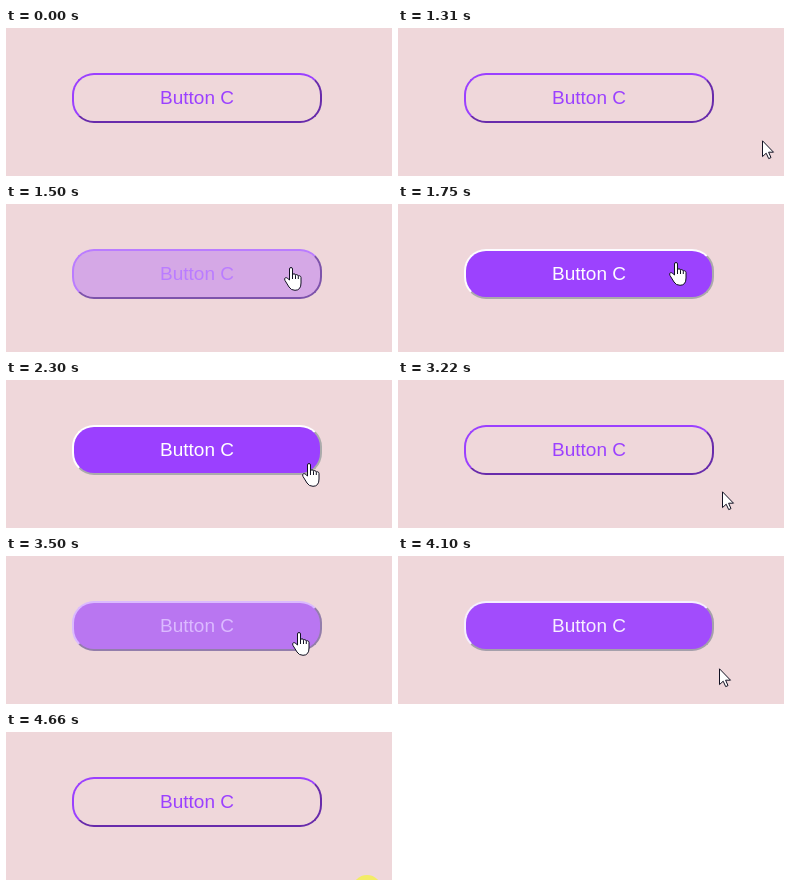
Animation of 386x148 px, one loop 4790 ms. Source, as an HTML page:

```html
<!DOCTYPE html>
<html lang="en">
<head>
<meta charset="utf-8">
<title>Button hover</title>
<style>
  html, body { margin: 0; width: 100%; height: 100%; overflow: hidden; background: #efd7da; }
  #button {
    position: absolute; left: 66px; top: 45px; width: 250px; height: 50px;
    box-sizing: border-box; padding: 0; border: 2px outset; border-radius: 22px;
    font: 19px Arial, "Liberation Sans", sans-serif; text-align: center;
  }
  svg { position: absolute; left: 0; top: 0; pointer-events: none; }
  #arrow, #hand { fill: #fff; stroke: #112; stroke-linejoin: round; }
</style>
</head>
<body>
<button id="button">Button C</button>
<svg width="386" height="148">
  <circle id="click" cx="361" cy="157.6" r="14.6" fill="#f3ec66"/>
  <path id="arrow" d="M.5 .8V16.6L4.2 13.2 6.7 18.6 9 17.6 6.6 12.2H11.5Z"/>
  <path id="hand" d="M-1.5 13V2Q-1.5 .5 0 .5T1.5 2V8Q1.5 6.8 3 6.8T4.5 8.3Q4.5 7.5 5.8 7.6T7.3 9.2Q7.5 8.5 8.7 8.8T10 10.5V16Q10 23.3 4 23.3Q0 23.3-2 20L-6 13.5Q-7 11.5-5.7 10.8Q-4.5 10.3-3.2 11.5ZM1.5 8V12M4.5 8.3V12M7.3 9.2V12"/>
</svg>
<script>
const LOOP = 4790, FADE = 400;
const PURPLE = [155, 64, 255];
const VISITS = [[1418, 2320], [3353, 4063]]; // pointer enters and leaves the button

const smooth = k => k * k * (3 - 2 * k);
const brake = k => 1 - (1 - k) ** 2;
const START = [366, 152];
const MOVES = [
  { at: 350, time: 60, to: [365, 112], pace: brake },
  { at: 1310, time: 270, to: [278, 58], pace: brake },
  { at: 2180, time: 250, to: [331, 111], pace: smooth },
  { at: 2950, time: 60, to: [324, 111], pace: smooth },
  { at: 3220, time: 490, to: [286, 68], pace: brake },
  { at: 3980, time: 230, to: [350, 150], pace: smooth }
];
const [button, click, arrow, hand] =
  ["button", "click", "arrow", "hand"].map(id => document.getElementById(id));

const clamp = x => Math.min(1, Math.max(0, x));

// The CSS "ease" curve, cubic-bezier(.25, .1, .25, 1)
function ease(x) {
  const curve = (s, a, b) => 3 * s * (1 - s) ** 2 * a + 3 * s * s * (1 - s) * b + s ** 3;
  let low = 0, high = 1;
  for (let i = 0; i < 20; i++) {
    const mid = (low + high) / 2;
    if (curve(mid, .25, .25) < x) low = mid; else high = mid;
  }
  return curve(low, .1, 1);
}

function pointerAt(t) {
  return MOVES.reduce((from, { at, time, to, pace }) => {
    const k = pace(clamp((t - at) / time));
    return from.map((v, i) => v + (to[i] - v) * k);
  }, START).map(Math.round);
}

const show = (el, on) => el.style.display = on ? "" : "none";

function draw(now) {
  const t = now % LOOP;
  const fade = start => ease(clamp((t - start) / FADE));
  const fill = VISITS.reduce((sum, [enter, leave]) => sum + fade(enter) - fade(leave), 0);
  button.style.color = button.style.borderColor =
    `rgb(${PURPLE.map(c => Math.round(c + (255 - c) * fill))})`;
  button.style.backgroundColor = `rgba(${PURPLE}, ${fill.toFixed(4)})`;

  const over = VISITS.some(([enter, leave]) => t >= enter && t < leave);
  const place = `translate(${pointerAt(t)})`;
  arrow.setAttribute("transform", place);
  hand.setAttribute("transform", place);
  show(arrow, !over);
  show(hand, over);
  show(click, t >= 4660);
  requestAnimationFrame(draw);
}
draw(0);
</script>
</body>
</html>
```
